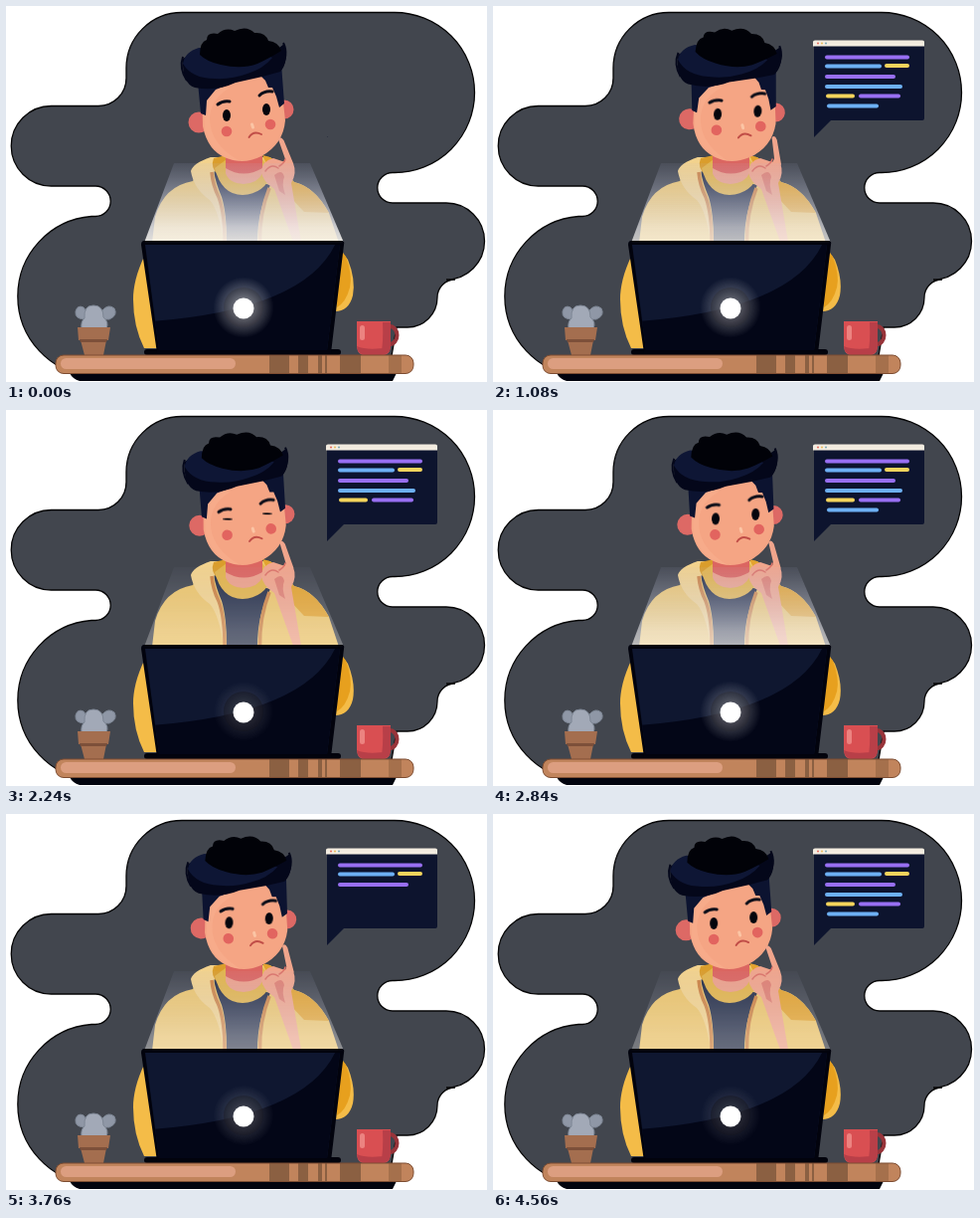
Write an HTML page without scripts that moves like this. It is 484 px wide and 378 px high and loops after 4.8 s.

```html
<!DOCTYPE html>
<html lang="en">
<head>
<meta charset="utf-8">
<title>Thinking at the laptop</title>
<style>
@property --typed { syntax: "<number>"; inherits: true; initial-value: 0; }
@property --tilt { syntax: "<angle>"; inherits: true; initial-value: 0deg; }
html, body { margin: 0; width: 100%; height: 100%; overflow: hidden; background: #fff; }
svg { display: block; width: 100vw; height: 100vh; }
.person, .glow, .bubble, .code, .eyes ellipse, .brows { animation: 4.8s linear infinite; }

.person { animation-name: sway; }
.head { transform-origin: 240px 165px; transform: rotate(var(--tilt)); }
.finger { transform-origin: 285px 163px; transform: rotate(calc(var(--tilt) * 3)); }
@keyframes sway {
  0% { --tilt: 0deg; }
  7% { --tilt: 1.7deg; }
  14.17% { --tilt: 3.9deg; }
  22.9% { --tilt: 4.2deg; }
  31.67% { --tilt: 4deg; }
  46.67% { --tilt: .9deg; }
  49.2% { --tilt: .7deg; }
  59.17% { --tilt: 2.1deg; }
  68.7% { --tilt: 3deg; }
  78.33% { --tilt: 2.6deg; }
  95%, 100% { --tilt: .2deg; }
}

.eyes ellipse { transform-box: fill-box; transform-origin: center; animation-name: blink; }
@keyframes blink {
  0%, 44.6%, 48.8%, 100% { transform: none; }
  46%, 47.4% { transform: scale(1.2, .17); }
}
.brows { animation-name: frown; }
@keyframes frown {
  0%, 44.6%, 48.8%, 100% { transform: none; }
  46%, 47.4% { transform: translateY(4px); }
}

.glow { animation-name: flicker; }
@keyframes flicker {
  0% { opacity: 1; }
  14.17% { opacity: .82; }
  31.67% { opacity: .82; }
  46.67% { opacity: .35; }
  59.17% { opacity: .75; }
  78.33% { opacity: .48; }
  95%, 100% { opacity: .35; }
}

.bubble { transform-origin: 323px 132px; animation-name: pop; }
@keyframes pop {
  0% { transform: scale(0); }
  3.33%, 100% { transform: none; }
}

.code { animation-name: type; }
@keyframes type {
  0%, 3.33% { --typed: 0; }
  19.58%, 30.83% { --typed: 6; }
  30.84%, 33.1% { --typed: 0; }
  49.6%, 68.33% { --typed: 6; }
  68.34%, 70.2% { --typed: 0; }
  86.7%, 100% { --typed: 6; }
}
.code rect {
  height: 4px; rx: 2px;
  transform-box: fill-box; transform-origin: left;
  transform: scaleX(clamp(0, (var(--typed) - var(--at)) * var(--speed, 1.1), 1));
}
.purple { fill: #986ff2; }
.blue { fill: #6db0f3; }
.yellow { fill: #f3d45c; }
</style>
</head>
<body>
<svg viewBox="0 0 484 378" preserveAspectRatio="none">
  <defs>
    <linearGradient id="beam" x1="0" y1="0" x2="0" y2="1">
      <stop offset="0" stop-color="#b9c0e4" stop-opacity=".1"/>
      <stop offset=".45" stop-color="#d5d8e6" stop-opacity=".5"/>
      <stop offset=".8" stop-color="#efeef0" stop-opacity=".8"/>
      <stop offset="1" stop-color="#f7f4ee" stop-opacity=".9"/>
    </linearGradient>
    <radialGradient id="halo">
      <stop offset=".25" stop-color="#fff" stop-opacity=".42"/>
      <stop offset="1" stop-color="#fff" stop-opacity="0"/>
    </radialGradient>
    <clipPath id="tableShape"><rect x="50" y="351" width="360" height="18.5" rx="8"/></clipPath>
    <clipPath id="lidShape"><path d="M140 240H336L323 346H154Z"/></clipPath>
  </defs>

  <path fill="#42464e" stroke="#050506" stroke-width="1.300" d="M177 6.500H391A80.500 80.500 0 0 1 391 167.500H389A15.250 15.250 0 0 0 389 198H443A38.500 38.500 0 0 1 443 275H452A18 18 0 0 0 434 293A30 30 0 0 1 404 323H393L388 352L86 372A80.500 80.500 0 0 1 86 211.500H90A15.250 15.250 0 0 0 90 181H45.500A40.250 40.250 0 0 1 45.500 100.500H93A28 28 0 0 0 121 72.500V62.500A56 56 0 0 1 177 6.500Z"/>

  <g class="bubble">
    <path fill="#0d142e" d="M323 36H434V113Q434 115 432 115H340L323 132Z"/>
    <path fill="#f3ece0" d="M322 40.500V36Q322 34.500 324 34.500H432Q434 34.500 434 36V40.500Z"/>
    <circle cx="327" cy="37.500" r="1" fill="#e6695a"/>
    <circle cx="331" cy="37.500" r="1" fill="#e9bb58"/>
    <circle cx="335" cy="37.500" r="1" fill="#79a8b5"/>
    <g class="code">
      <rect class="purple" x="334" y="49.500" width="85" style="--at:0"/>
      <rect class="blue" x="334" y="58.500" width="57" style="--at:1;--speed:1.5"/>
      <rect class="yellow" x="394" y="58" width="25" style="--at:1.6;--speed:3"/>
      <rect class="purple" x="334" y="69" width="71" style="--at:2"/>
      <rect class="blue" x="334" y="79" width="78" style="--at:3"/>
      <rect class="yellow" x="335" y="88.500" width="29" style="--at:4;--speed:2.5"/>
      <rect class="purple" x="368" y="88.500" width="42" style="--at:4.4;--speed:2"/>
      <rect class="blue" x="336" y="98.500" width="52" style="--at:5"/>
    </g>
  </g>

  <g class="person">
    <!-- sleeves, torso and shirt -->
    <path fill="#f4bc48" d="M139 344Q128 322 128 295C128 283 131 268 140 250L160 230H325L344 255Q352 275 349 291Q345 307 331 307L320 320L155 344Z"/>
    <path fill="#e7a01e" d="M333 240L342 252Q349 270 346 283Q342 298 333 303Z"/>
    <path fill="#edc56a" d="M147 238L150 212Q159 181 188 176L206 152H266L290 177Q311 182 325 208L335 238Z"/>
    <path fill="#e3a32f" d="M258 150Q272 152 276 163L290 177Q306 181 318 197L325 208L300 207L270 175Z"/>
    <path fill="#262f48" d="M209 166Q211 178 217 192Q222 208 222 238H253Q253 205 266 180Z"/>
    <path fill="#f2d28d" d="M206 152Q188 158 186 166Q189 184 205 195Q214 205 219 236Q222 205 214 190Q203 172 216 152Z"/>
    <path fill="none" stroke="#cd8343" stroke-width="3.500" d="M207 167Q208 180 214 192Q220 208 220 238M265 183Q255 208 255.500 238"/>
    <path fill="#da9d2c" d="M209 153L222 150V163L214 170Q205 163 209 153Z"/>
    <path fill="#e2b44c" d="M210 163Q217 190 238 190Q260 189 268 168L258 154H222Z"/>
    <path fill="#eca18b" d="M221 150H258V168Q254 178 239 179Q224 178 221 168Z"/>
    <path fill="#db6661" d="M221 145H258V163Q239 174 221 163Z"/>

    <g class="head">
      <circle cx="194" cy="117" r="10.500" fill="#dd6965"/>
      <circle cx="280" cy="104" r="9.500" fill="#dd6965"/>
      <path fill="#f5a584" d="M197 78L198 121Q203 146 222 153Q239 160 257 151Q279 139 281 115L275 62Z"/>
      <path fill="#f9b494" opacity=".4" d="M198 91Q215 80 225 82Q199 98 207 126Q214 145 236 156Q210 154 200 128Z"/>
      <path fill="#0c1330" d="M193 77L196 108L201 110L202 95L211 84L229 77L256 70L261 75L264 82L268 82L272 91L275 102L280 98L277 58Z"/>
      <path fill="#04071a" d="M178 53Q177 78 190 82Q212 86 231 77L258 71L276 66Q285 56 280 38L271 45L187 48Z"/>
      <path fill="#0e1635" d="M178 58Q180 46 194 42Q220 45 252 44L268 52Q259 63 243 68Q227 74 210 73Q187 73 178 58Z"/>
      <path fill="#010208" d="M195 49Q195 36 202 34Q202 26 213 28Q221 21 230 25Q242 19 250 27Q261 26 264 35Q274 36 277 45Q264 53 253 58Q237 64 216 59Q202 56 195 49Z"/>
      <path fill="none" stroke="#04071a" stroke-width="2" d="M279 37Q285 49 276 64M178 51Q174 63 182 75"/>
      <path class="brows" fill="none" stroke="#0b0d18" stroke-width="3" stroke-linecap="round" d="M213 99Q218 95 225 96M255 90Q260 85 268 86"/>
      <g class="eyes" fill="#05060d">
        <ellipse cx="222" cy="110" rx="4" ry="6"/>
        <ellipse cx="262" cy="104" rx="4" ry="6"/>
      </g>
      <g fill="#e2645f">
        <circle cx="222" cy="126" r="5.300"/>
        <circle cx="266" cy="119" r="5.300"/>
      </g>
      <path fill="none" stroke="#fbc5a5" stroke-width="3" stroke-linecap="round" d="M247.500 119L248.500 122"/>
      <path fill="none" stroke="#c04d47" stroke-width="1.900" stroke-linecap="round" d="M244.500 132Q249 125 257 129"/>
    </g>

    <!-- hand on the chin -->
    <path class="finger" fill="#f0a58c" d="M274 134Q276 130 279.500 135L289 158L288 166L279 164L281 154Z"/>
    <path fill="#f0a58c" d="M289 158Q293 168 287 178L297 237H289L270 184Q258 176 257 167Q258 155 269 153L278 156Z"/>
    <path fill="none" stroke="#dc7469" stroke-width="1.500" stroke-linecap="round" d="M281 154Q280 158 275 161M261 166Q267 158 274 163"/>
    <path fill="#df8173" d="M270 170Q278 163 280 172Q277 178 281 190L275 186Z"/>
  </g>

  <path class="glow" fill="url(#beam)" d="M169 158H306L340 238H139Z"/>

  <!-- laptop -->
  <rect x="139" y="345" width="198" height="6" rx="3" fill="#02030c"/>
  <path fill="#02030d" d="M139 236H338Q341 236 340 240L327 349H152L136 240Q136 236 139 236Z"/>
  <g clip-path="url(#lidShape)">
    <path fill="#0f1730" d="M135 235H345V350H135Z"/>
    <path fill="#030617" d="M332 238Q302 305 147 317V350H345V238Z"/>
  </g>
  <circle cx="239" cy="303" r="20" fill="#05060f" opacity=".45"/>
  <circle class="glow" cx="239" cy="303" r="31" fill="url(#halo)"/>
  <circle cx="239" cy="304" r="10.500" fill="#fff"/>

  <!-- cactus -->
  <g fill="#8f97a6" stroke="#7e8795">
    <path d="M80 315Q69 315 70 307Q72 300 78 303L81 307ZM97 306Q103 299 109 304Q113 311 104 315H97Z"/>
    <path fill="#a2a9b7" d="M76 324Q75 317 79 314Q78 301 88 301Q98 301 98 313Q104 318 101 324Z"/>
  </g>
  <path fill="#a46e4f" d="M72 323H105L103 336H101L98 351H79L75 336H73Z"/>
  <path fill="#7d503a" d="M74 335H102L101 338H75Z"/>

  <!-- cup -->
  <ellipse cx="386" cy="331" rx="7.500" ry="9" fill="none" stroke="#98343a" stroke-width="4"/>
  <path fill="#d94f52" d="M353 317H387V343Q386 351 379 351H361Q354 351 353 343Z"/>
  <path fill="#b83f48" d="M379 318H387V343Q386 351 377 351Q380 340 379 318ZM353 342Q364 347 386 343Q385 351 377 351H361Q354 350 353 342Z"/>
  <rect x="356" y="321" width="5" height="15" rx="2.500" fill="#ec8380"/>

  <!-- table -->
  <path fill="#02040e" d="M64 369H393L389 377H74Q67 375 64 369Z"/>
  <g clip-path="url(#tableShape)">
    <path fill="#c1845c" d="M50 350H410V370H50Z"/>
    <path fill="#8b6042" d="M265 350H285V370H265ZM294 350H304V370H294ZM314 350H318V370H314ZM321 350H323V370H321ZM336 350H357V370H336Z"/>
    <path fill="#a5704c" d="M385 350H398V370H385Z"/>
    <rect x="55" y="354" width="176" height="11" rx="5.500" fill="#dc9e80"/>
  </g>
  <rect x="50" y="351" width="360" height="18.500" rx="8" fill="none" stroke="#7d4d32"/>
</svg>
</body>
</html>
```
